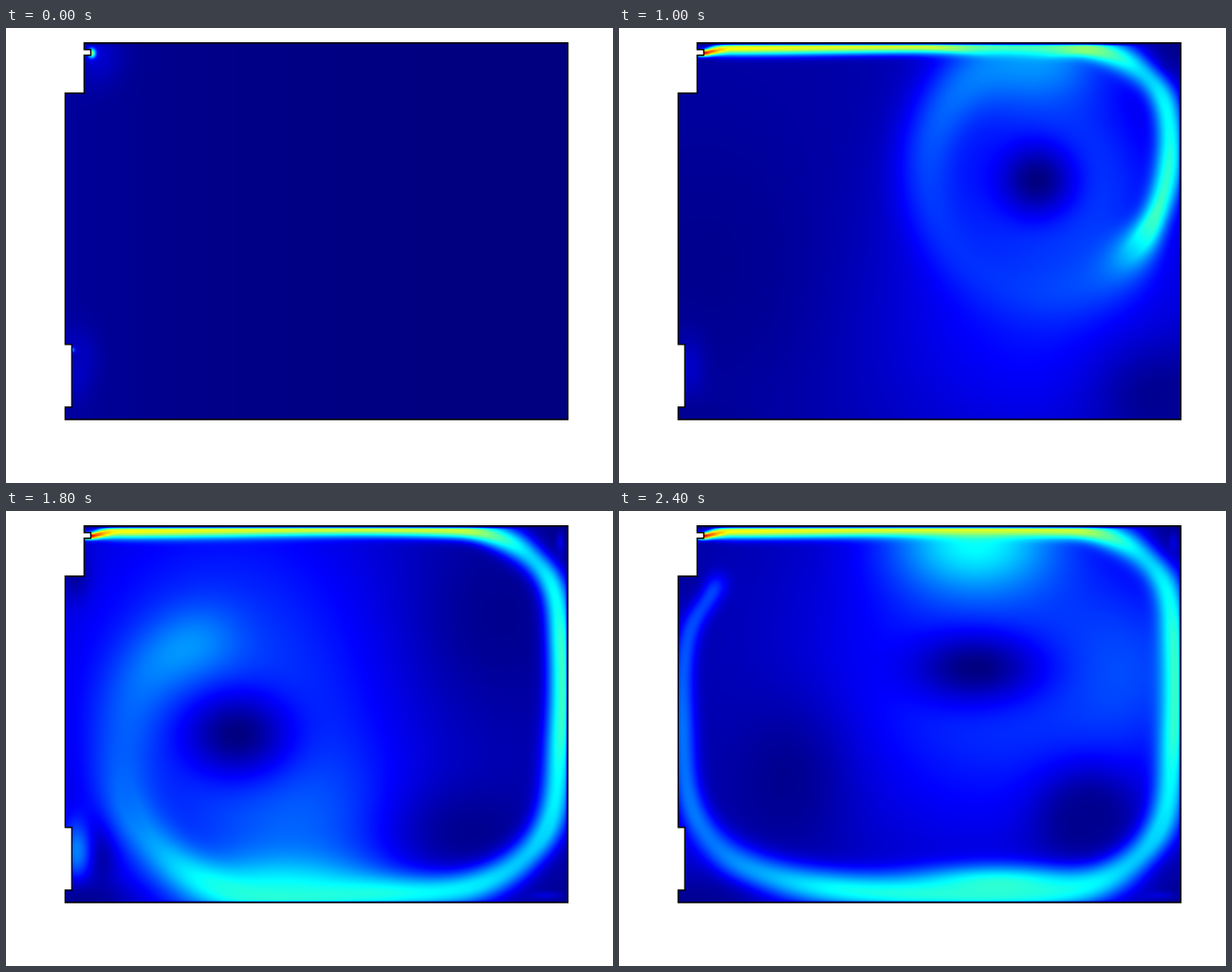
These frames come from a looping animation (640x480 px, 2.5 s). An HTML page with a canvas:

```html
<!DOCTYPE html>
<html lang="en">
<head>
<meta charset="utf-8">
<title>Room air flow</title>
<style>
html, body { margin: 0; width: 100%; height: 100%; overflow: hidden; background: #fff; }
canvas { display: block; width: 640px; height: 480px; }
</style>
</head>
<body>
<canvas id="c" width="640" height="480"></canvas>
<script>
const ctx = document.getElementById('c').getContext('2d');
const LOOP = 2500, STEP = 100, GROW = 600;
const X0 = 62, Y0 = 15, CELL = 2, W = 268, H = 202, PW = 532, PH = 399;
const field = new Float32Array(W * H);
const sum = new Float32Array(W * H), mass = new Float32Array(W * H);
const img = ctx.createImageData(PW, PH);

const clamp = (v, a, b) => Math.max(a, Math.min(b, v));
const mix = (a, b, k) => a + (b - a) * k;
const smooth = k => k * k * (3 - 2 * k);
const bell = d => Math.exp(-d * d);

// Cubic through rows placed at increasing positions ts
function spline(ts, rows, t) {
  const last = ts.length - 1;
  if (t <= ts[0]) return rows[0];
  if (t >= ts[last]) return rows[last];
  let i = 0;
  while (t > ts[i + 1]) i++;
  const h = ts[i + 1] - ts[i], u = (t - ts[i]) / h;
  const slope = (n, k) => {
    const a = Math.max(0, n - 1), b = Math.min(last, n + 1);
    return (rows[b][k] - rows[a][k]) / (ts[b] - ts[a]) * h;
  };
  const a = u * (1 - u) * (1 - u), b = u * u * (u - 1);
  return rows[i].map((p, k) => mix(p, rows[i + 1][k], smooth(u)) + a * slope(i, k) + b * slope(i + 1, k));
}

const KEYS = [600, 1000, 1400, 1800, 2200, 2400];
const at = (rows, t) => spline(KEYS, rows, t);

// Eddy eye: x, y, rx, ry
const eye = [[330,117,42,30], [440,160,45,43], [412,265,48,40],
  [243,235,58,46], [288,165,65,42], [375,165,70,38]];
// Wide slow swirl: x, y, rx, ry, speed
const body = [[370,240,190,120,.1], [440,310,190,150,.13], [420,270,200,230,.15],
  [230,190,190,230,.19], [230,190,200,170,.19], [390,170,190,190,.18]];
// Brighter part of it: x, y, r, speed
const side = [[330,110,95,.2], [455,165,110,.22], [520,250,95,.24],
  [300,330,105,.22], [120,150,115,.18], [520,170,95,.2]];
// Floor glow: x, rx, ry, strength
const floor = [[480,70,40,0], [480,70,40,0], [395,95,52,1],
  [290,110,32,.7], [345,50,20,1], [400,90,20,1]];
const ceiling = [[1], [.5], [0], [0], [1], [1]];
// Still air: x, y, rx, ry
const still = [
  [[555,50,60,40], [575,40,4,4], [520,85,60,40], [520,110,80,100], [520,130,60,110], [500,320,40,40]],
  [[590,390,90,70], [570,390,70,60], [575,385,30,30], [490,340,70,50], [480,340,90,60], [485,330,50,50]],
  [[90,250,90,150], [90,250,140,170], [90,220,130,200], [98,365,18,40], [200,332,50,30], [175,285,65,85]]
];

// Stream: x, y, speed, half width
const nozzle = [[82,26,.92,3.5], [90,26,.9,3.5], [101,23.5,.73,5], [118,21,.63,7.5]];
const wallPath = [[480,20,.57,9], [537,35,.4,15], [573,71,.37,15], [584,130,.42,15], [584,240,.42,16],
  [568,340,.34,18], [501,393,.35,19], [390,403,.4,19], [225,398,.38,20], [125,372,.27,21],
  [78,318,.24,16], [67,230,.24,14], [73,130,.2,12], [105,72,.21,13]];
// Roll-up: x, y, rx, ry, first free node, speed, half width
const ended = [225, 200, 95, 95, 15, .22, 30];
const roll = [[335,112,108,94,-2,.26,25], [450,150,125,125,3,.24,34], [400,265,110,125,6,.2,45],
  [225,235,95,100,9,.26,40], ended, ended];

function streamNodes(t) {
  const [cx, cy, rx, ry, first, v, w] = at(roll, t);
  return wallPath.map(([px, py, pv, pw], i) => {
    const free = smooth(clamp((i - first + 1) / 2, 0, 1));
    const a = (27 * i - 75) * Math.PI / 180;
    const soft = i < 5 ? 0 : free;
    return [mix(px, cx + rx * Math.cos(a), free), mix(py, cy + ry * Math.sin(a), free),
      mix(pv, v + .07 * Math.cos(a + Math.PI / 4), soft), mix(pw, w, soft)];
  });
}

// Calls fn(index, weight) for every cell under a gaussian spot
function spot(x, y, rx, ry, fn) {
  const cx = (x - X0) / CELL, cy = (y - Y0) / CELL;
  rx = Math.max(rx, 2) / CELL;
  ry = Math.max(ry, 2) / CELL;
  const i0 = Math.max(0, Math.ceil(cx - 2.6 * rx)), i1 = Math.min(W - 1, cx + 2.6 * rx);
  const j0 = Math.max(0, Math.ceil(cy - 2.6 * ry)), j1 = Math.min(H - 1, cy + 2.6 * ry);
  for (let j = j0; j <= j1; j++) {
    const gy = bell((j - cy) / ry);
    for (let i = i0; i <= i1; i++) fn(j * W + i, gy * bell((i - cx) / rx));
  }
}

function patch(x, y, rx, ry, v, k = 1) {
  if (k > 0) spot(x, y, rx, ry, (n, g) => { field[n] += (v - field[n]) * g * k; });
}

function ribbon(nodes) {
  sum.fill(0);
  mass.fill(0);
  const pos = [0];
  for (let i = 1; i < nodes.length; i++) {
    const a = nodes[i - 1], b = nodes[i];
    pos.push(pos[i - 1] + Math.max(.5, Math.hypot(b[0] - a[0], b[1] - a[1])));
  }
  const end = pos[pos.length - 1];
  for (let s = 0; s < end;) {
    const [x, y, v, w0] = spline(pos, nodes, s), w = Math.max(w0, 2.5);
    const ds = w * .45, k = .45 / Math.sqrt(Math.PI);
    spot(x, y, w, w, (n, g) => { mass[n] += g * k; sum[n] += g * k * v; });
    s += ds;
  }
  for (let n = 0; n < field.length; n++) {
    if (mass[n] > 1e-4) field[n] += (sum[n] / mass[n] - field[n]) * Math.min(1, mass[n]);
  }
}

function flow(t) {
  const s = Math.min(1, t / GROW) ** .65, start = 1 - s;
  const sx = x => 89 + (x - 89) * s, sy = y => 18 + (y - 18) * s;
  const grown = (x, y, rx, ry, v, k) => patch(sx(x), sy(y), rx * s, ry * s, v, s > 0 ? k : 0);
  const [ex, ey, erx, ery] = at(eye, t);
  const [dx, dy, dr, dv] = at(side, t);
  const [fx, frx, fry, fk] = at(floor, t);
  for (let n = 0; n < field.length; n++) {
    field[n] = mix(.028 * Math.exp(-(n % W) * CELL / 150), .04, s);
  }
  grown(...at(body, t));
  grown(dx, dy, dr, dr, dv);
  still.forEach(rows => patch(...at(rows, t), .015, s));
  patch(74, 358, 16, 34, .07 + .18 * bell((t - 1800) / 200));
  grown(ex, 33, 85, 55, .38, clamp(at(ceiling, t)[0], 0, 1));
  if (s > 0) {
    ribbon(nozzle.concat(streamNodes(t).map(([x, y, v, w]) => [sx(x), sy(y), v, w * Math.sqrt(s)])));
  }
  patch(fx, 394, frx, fry, .42, clamp(fk, 0, 1));
  // Corners
  patch(592, 16, 32, 32, .01, s);
  patch(592, 413, 30, 40, .02, s);
  patch(75, 410, 60, 20, .02, s);
  patch(72, 66, 16, 26, .03, s);
  const late = clamp((t - 1000) / 400, 0, 1);
  patch(584, 33, 4, 11, .1, late);
  patch(568, 405, 18, 4, .09, late);
  grown(ex, ey, erx, ery, 0);
  // First puff at the openings
  patch(95, 28, 26, 30, .08, start);
  patch(90, 26, 4, 5, .55, start);
  patch(75, 345, 20, 25, .06, start);
  patch(70, 339, 2.5, 3, .27, start);
}

const TONES = 1024;
const tone = new Uint8ClampedArray(TONES * 3);
for (let i = 0; i < TONES; i++) {
  for (let k = 0; k < 3; k++) {
    tone[i * 3 + k] = 255 * clamp(1.5 - Math.abs(4 * i / (TONES - 1) - 3 + k), 0, 1);
  }
}

const wall = d => 1 - .85 * bell(d / 1.6);

const outline = new Path2D('M82.4 15.8H592.4V413H62.4V400H69.4V333.8H62.4V68.8H82.4V28.8H89.4V22.8H82.4Z');
const outside = new Path2D('M0 0H640V480H0Z');
outside.addPath(outline);

function draw(t) {
  flow(t);
  const px = img.data;
  for (let y = 0, o = 0; y < PH; y++) {
    const j = y >> 1, fy = (y & 1) / 2;
    const ky = wall(y - 1) * wall(PH - 1 - y);
    for (let x = 0; x < PW; x++, o += 4) {
      const n = j * W + (x >> 1), fx = (x & 1) / 2;
      const v = mix(mix(field[n], field[n + 1], fx), mix(field[n + W], field[n + W + 1], fx), fy);
      const c = 3 * Math.round(clamp(v * ky * wall(PW - 2 - x), 0, 1) * (TONES - 1));
      for (let k = 0; k < 3; k++) px[o + k] = tone[c + k];
      px[o + 3] = 255;
    }
  }
  ctx.putImageData(img, X0, Y0);
  ctx.fillStyle = '#fff';
  ctx.fill(outside, 'evenodd');
  ctx.strokeStyle = '#000';
  ctx.lineWidth = 1.4;
  ctx.stroke(outline);
}

const begin = performance.now();
let shown = -1;
function tick() {
  const step = Math.floor((performance.now() - begin) % LOOP / STEP);
  if (step !== shown) {
    shown = step;
    draw(step * STEP);
  }
  requestAnimationFrame(tick);
}
tick();
</script>
</body>
</html>
```
